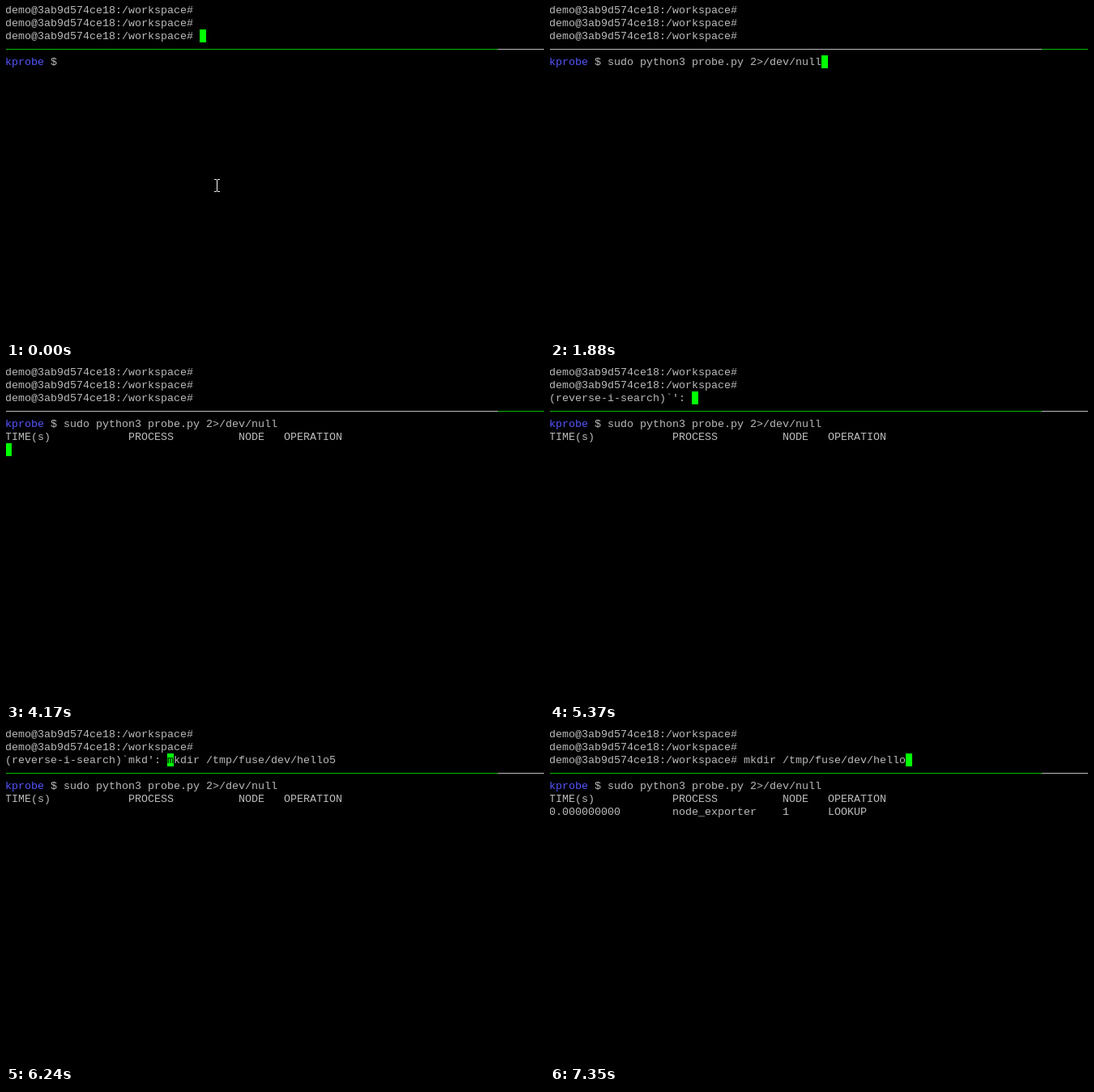
Recreate the animation shown at these times as an HTML page with a canvas. Size 664 by 413 pixels, loop 8 s.

```html
<!DOCTYPE html>
<html lang="en">
<head>
<meta charset="utf-8">
<title>Terminal</title>
<style>
html, body { margin: 0; height: 100%; overflow: hidden; background: #000; }
canvas { display: block; }
</style>
</head>
<body>
<canvas id="screen" width="664" height="413"></canvas>
<script>
const ctx = document.getElementById('screen').getContext('2d');
const LOOP = 8000, CELL = 8, ROW = 16, SPLIT = 607;
const GREY = '#bbbbbb', GREEN = '#00ff00', ACTIVE = '#00bb00', BLUE = '#5555ff';
const PROMPT = 'demo@3ab9d574ce18:/workspace# ';
const MKDIR = 'mkdir /tmp/fuse/dev/hello5';
const PROBE = 'sudo python3 probe.py 2>/dev/null';
const HEADER = 'TIME(s)'.padEnd(19) + 'PROCESS'.padEnd(17) + 'NODE'.padEnd(7) + 'OPERATION';
const RESULT = '0.000000000'.padEnd(19) + 'node_exporter'.padEnd(17) + '1'.padEnd(7) + 'LOOKUP';

// Reverse search line, with the cursor on the last match
function search(typed) {
  const found = typed && MKDIR;
  const head = "(reverse-i-search)`" + typed + "': ";
  return { entry: head + found, cursor: [head.length + found.lastIndexOf(typed), 2] };
}

// [time, changed state]; cursor is [column, row]
const steps = [
  [0, { entry: PROMPT, command: '', header: '', result: '', cursor: [30, 2], lower: false, mouse: true }],
  [130, { mouse: false }],
  [900, { lower: true, cursor: [9, 4] }],
  [1330, { command: 'ls', cursor: [11, 4] }],
  [1430, { command: 'clear', cursor: [14, 4] }],
  [1880, { command: PROBE, cursor: [42, 4] }],
  [2740, { cursor: [0, 5] }],
  [4170, { header: HEADER, cursor: [0, 6] }],
  [4600, { lower: false, cursor: [30, 2] }],
  [5370, search('')],
  [6020, search('m')],
  [6130, search('mk')],
  [6240, search('mkd')],
  [6360, search('mkdir')],
  [6580, { result: RESULT }],
  [6800, { entry: PROMPT + MKDIR, cursor: [30, 2] }],
  [7020, { cursor: [56, 2] }],
  [7350, { entry: PROMPT + MKDIR.slice(0, -1), cursor: [55, 2] }]
];

const cellX = col => col * CELL - 1;
const cellY = row => row * ROW - 3;

function rect(x, y, w, h, color) {
  ctx.fillStyle = color;
  ctx.fillRect(x, y, w, h);
}

function print(text, col, row, color = GREY) {
  ctx.fillStyle = color;
  [...text].forEach((c, i) => ctx.fillText(c, cellX(col + i), cellY(row) + 12));
}

function drawMouse() {
  rect(260, 215, 1, 14, '#fff');
  for (const y of [214, 229]) {
    rect(257, y, 3, 1, '#fff');
    rect(261, y, 3, 1, '#fff');
  }
}

function draw(time) {
  const s = {};
  for (const [start, change] of steps) if (time >= start) Object.assign(s, change);

  rect(0, 0, 664, 413, '#000');
  ctx.font = '13.333px "Liberation Mono", "Courier New", monospace';
  const lines = [PROMPT, PROMPT, s.entry, '', 'kprobe $ ' + s.command, s.header, s.result];
  lines.forEach((line, row) => {
    if (row === 4) {
      print('kprobe', 0, row, BLUE);
      print(line.slice(6), 6, row);
    } else print(line, 0, row);
  });

  rect(0, 53, SPLIT, 1, s.lower ? GREY : ACTIVE);
  rect(SPLIT, 53, 664 - SPLIT, 1, s.lower ? ACTIVE : GREY);

  const [col, row] = s.cursor;
  rect(cellX(col), cellY(row), CELL, ROW, GREEN);
  print(lines[row][col] || '', col, row, '#000');
  if (s.mouse) drawMouse();
}

function tick() {
  draw(performance.now() % LOOP);
  requestAnimationFrame(tick);
}
tick();
</script>
</body>
</html>
```
